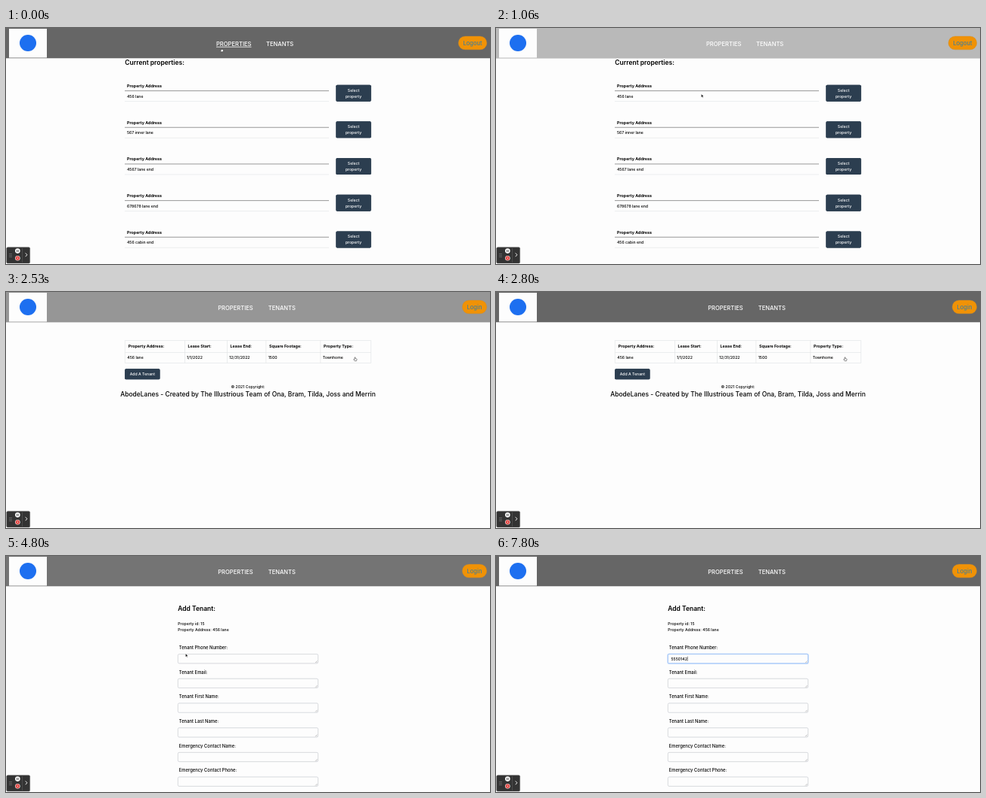
Write an HTML page that moves like this. It is 640x314 px and loops after 8 s.

```html
<!DOCTYPE html>
<html lang="en">
<head>
<meta charset="utf-8">
<title>Property manager</title>
<style>
  html, body { margin: 0; width: 100%; height: 100%; overflow: hidden; background: #fdfdfd; }
  svg { display: block; width: 100vw; height: 100vh; }
  text { font-family: Inter, "Open Sans", sans-serif; font-size: 5.15px; font-weight: 450; fill: #000; white-space: pre; }
  .bold { font-size: 5.35px; font-weight: 700; }
  .title { font-size: 8.5px; font-weight: 560; }
  .footer { font-size: 8.47px; font-weight: 540; }
  .label { font-size: 5.88px; }
  .nav { font-size: 7.6px; font-weight: 480; fill: #fff; }
  .pill { font-size: 7.5px; font-weight: 480; fill: #467f98; }
  .mid { text-anchor: middle; }
  .button text { fill: #fff; }
  .button rect { fill: #2c3e50; }
  .button.hover rect { fill: #587a9c; }
  .button.hover text { text-decoration: underline; }
  .button.focus rect { stroke: #5a96ee; stroke-width: 1.2; }
  .button.focus .ring { stroke: #aecdf8; stroke-width: 2.6; }
  .field rect { fill: #fdfdfd; stroke: #d3d6da; stroke-width: .7; }
  .field.focus rect { stroke: #86b4f5; }
  .field.focus .ring { stroke: #cfe2fc; stroke-width: 2.4; }
</style>
</head>
<body>
<svg id="stage" viewBox="0 0 640 314" preserveAspectRatio="none"></svg>
<script>
const LOOP = 8000;
const LOADS = [760, 2080, 4200];
const FADE = 660;
const CLICKS = [[1870, 2080], [4060, 4200], [5600, 5800]];
const PHONE = "5550142";
const KEYS = [6400, 6600, 6800, 7060, 7260, 7530, 7800];
const ADDRESSES = ["456 lane", "567 inner lane", "4567 lane end", "678678 lane end", "456 cabin end"];

// time, x, y of the pointer tip
const PATH = [
  [0, 285, 27], [650, 285, 27], [1060, 271.5, 88], [1150, 271.5, 88],
  [1750, 461.5, 87], [2850, 461.5, 87], [3660, 185.5, 108.5], [4250, 185.5, 108.5],
  [4800, 237.5, 130], [5130, 237.5, 130], [5400, 238, 136.5], [LOOP, 238, 136.5]
];

const stage = document.getElementById("stage");

function add(parent, tag, attrs = {}, content = "") {
  const node = document.createElementNS("http://www.w3.org/2000/svg", tag);
  for (const name in attrs) node.setAttribute(name, attrs[name]);
  node.textContent = content;
  return parent.appendChild(node);
}
const group = (parent, attrs) => add(parent, "g", attrs);
const text = (parent, x, y, content, cls = "") => add(parent, "text", { x, y, class: cls }, content);
const rect = (parent, x, y, width, height, attrs = {}) =>
  add(parent, "rect", { x, y, width, height, ...attrs });
const circle = (parent, cx, cy, r, fill) => add(parent, "circle", { cx, cy, r, fill });
const path = (parent, d, stroke, width = 0.6, fill = "none") =>
  add(parent, "path", { d, stroke, "stroke-width": width, fill });
const show = (node, visible) => node.setAttribute("display", visible ? "inline" : "none");

function button(parent, x, y, w, h, lines) {
  const g = group(parent, { class: "button" });
  rect(g, x, y, w, h, { rx: 1.6, class: "ring" });
  rect(g, x, y, w, h, { rx: 1.6 });
  const top = y + h / 2 + 1.9 - (lines.length - 1) * 3.9;
  lines.forEach((line, i) => text(g, x + w / 2, top + i * 7.8, line, "mid"));
  return g;
}

function buildList(parent) {
  const g = group(parent);
  text(g, 157.3, 49.4, "Current properties:", "title");
  const buttons = ADDRESSES.map((address, i) => {
    const y = i * 48.67;
    text(g, 160, 79 + y, "Property Address", "bold");
    path(g, `M157 ${83.6 + y}H427`, "#555", 0.6);
    text(g, 160, 92.6 + y, address);
    path(g, `M157 ${97.6 + y}H427`, "#dfe2e5", 0.6);
    return button(g, 436.4, 75.7 + y, 46.3, 22, ["Select", "property"]);
  });
  return { g, button: buttons[0] };
}

function buildDetails(parent) {
  const g = group(parent);
  path(g, "M157.3 64.5H482.6V94.5H157.3ZM157.3 80.5H482.6M236.5 64.5V94.5M292.5 64.5V94.5M343.8 64.5V94.5M415.8 64.5V94.5", "#dfe2e5");
  const columns = [
    [160.3, "Property Address:", ADDRESSES[0]],
    [239, "Lease Start:", "1/1/2022"],
    [295.2, "Lease End:", "12/31/2022"],
    [346.7, "Square Footage:", "1500"],
    [418.7, "Property Type:", "Townhome"]
  ];
  for (const [x, head, value] of columns) {
    text(g, x + 1.4, 74.3, head, "bold");
    text(g, x, 89.2, value);
  }
  const addButton = button(g, 157.2, 102.3, 46.3, 14, ["Add A Tenant"]);
  text(g, 320, 127.6, "© 2021 Copyright:", "mid");
  text(g, 320, 138.8, "AbodeLanes - Created by The Illustrious Team of Ona, Bram, Tilda, Joss and Merrin", "footer mid");
  return { g, button: addButton };
}

function buildForm(parent) {
  const g = group(parent);
  text(g, 227.2, 73.2, "Add Tenant:", "title");
  text(g, 227.2, 92.3, "Property id: 15");
  text(g, 227.2, 100.3, "Property Address: " + ADDRESSES[0]);
  const labels = ["Tenant Phone Number:", "Tenant Email:", "Tenant First Name:",
    "Tenant Last Name:", "Emergency Contact Name:", "Emergency Contact Phone:"];
  const fields = labels.map((label, i) => {
    const y = i * 32.7;
    text(g, 228.8, 123.8 + y, label, "label");
    const field = group(g, { class: "field" });
    rect(field, 227.4, 130.6 + y, 185.2, 12.2, { rx: 1.6, class: "ring" });
    rect(field, 227.4, 130.6 + y, 185.2, 12.2, { rx: 1.6 });
    path(field, `M409 ${142 + y}l2.6-2.6M410.5 ${142 + y}l1.1-1.1`, "#777", 0.4);
    return field;
  });
  const typed = text(g, 231.5, 138.6, "");
  const caret = rect(g, 231.5, 133.7, 0.5, 6, { fill: "#111" });
  return { g, field: fields[0], typed, caret };
}

function buildHeader(parent) {
  rect(parent, 0, 40, 640, 1, { fill: "#000", opacity: 0.14 });
  const bar = rect(parent, 0, 0, 640, 40);
  rect(parent, 4, 1, 50, 38.5, { fill: "#fdfdfd" });
  circle(parent, 29, 20, 11, "#1d6ff0");
  const nav = [text(parent, 278, 23.8, "PROPERTIES", "nav"), text(parent, 344, 23.8, "TENANTS", "nav")];
  const pill = rect(parent, 598, 11, 38, 17.8, { rx: 8.9, fill: "#f09206", stroke: "#d08c28", "stroke-width": 0.4 });
  const pillText = text(parent, 617, 22.5, "", "pill mid");
  return { bar, nav, pill, pillText };
}

function buildRecorder(parent) {
  rect(parent, 0.8, 291.8, 30.8, 21.2, { rx: 1.5, fill: "#333", stroke: "#555", "stroke-width": 0.5 });
  for (let i = 0; i < 6; i++)
    circle(parent, 5 + (i % 2) * 2, 300.4 + (i >> 1) * 2, 0.5, "#aaa");
  circle(parent, 15.4, 296.6, 3.3, "#fff");
  path(parent, "M14.5 295.2v2.8M16.3 295.2v2.8", "#333", 0.8);
  circle(parent, 15.4, 306.2, 3.3, "#f6e4e4");
  circle(parent, 15.4, 306.2, 2.6, "#e03c38");
  path(parent, "M14.5 305.3l1.8 1.8M16.3 305.3l-1.8 1.8", "#fff", 0.6);
  path(parent, "M21.6 293V312", "#666", 0.5);
  path(parent, "M25.7 299.4l2.2 2.4-2.2 2.4", "#fff", 0.9);
}

function buildPointer(parent) {
  const g = group(parent);
  const ring = add(g, "circle", {
    cx: 0.4, cy: -0.6, r: 10.8, fill: "#c02850", "fill-opacity": 0.06,
    stroke: "#c0284f", "stroke-width": 1.1, "stroke-opacity": 0.7
  });
  const arrow = path(g, "M0 0V4.2L1 3.3 1.7 4.8 2.4 4.5 1.7 3.1H3Z", "#fff", 0.3, "#000");
  const hand = path(g, "M-.5 0Q0-.5.5 0V1.5L2.2 2Q2.7 2.3 2.4 3.2L1.9 4.7H-.5L-1.8 2.7Q-1.6 2.1-.5 2.7Z", "#222", 0.5, "#fff");
  const beam = path(g, "M-1-2.8Q0-2.8 0-2Q0-2.8 1-2.8M0-2V2M-1 2.8Q0 2.8 0 2Q0 2.8 1 2.8", "#111", 0.5);
  return { g, ring, arrow, hand, beam };
}

const list = buildList(stage);
const details = buildDetails(stage);
const form = buildForm(stage);
const header = buildHeader(stage);
buildRecorder(stage);
const pointer = buildPointer(stage);

function pointerAt(t) {
  const i = PATH.findIndex((p, k) => k > 0 && t <= p[0]);
  const [t0, x0, y0] = PATH[i - 1], [t1, x1, y1] = PATH[i];
  const u = (t - t0) / (t1 - t0), e = u * u * (3 - 2 * u);
  return [x0 + (x1 - x0) * e, y0 + (y1 - y0) * e];
}

// The header fades from white to grey after each page load.
function headerShade(t) {
  const start = LOADS.filter(load => load <= t).pop();
  const progress = start === undefined ? 1 : Math.min(1, (t - start) / FADE);
  return Math.round(255 - 153 * progress);
}

function render(t) {
  const onList = t < LOADS[1], onDetails = !onList && t < LOADS[2], onForm = t >= LOADS[2];
  show(list.g, onList);
  show(details.g, onDetails);
  show(form.g, onForm);

  const shade = headerShade(t);
  header.bar.setAttribute("fill", `rgb(${shade},${shade},${shade})`);
  header.nav[0].setAttribute("x", onList ? 278 : 280.2);
  header.nav[1].setAttribute("x", onList ? 344 : 346.7);
  header.pill.setAttribute("x", onList ? 598.2 : 603.3);
  header.pill.setAttribute("width", onList ? 37.6 : 32.4);
  header.pillText.setAttribute("x", onList ? 617 : 619.5);
  header.pillText.textContent = onList ? "Logout" : "Login";

  const [x, y] = pointerAt(t);
  const overNav = onList && y < 30;
  const overSelect = onList && x > 436;
  const overAdd = onDetails && x < 203.5 && y > 102;
  const overField = onForm && y > 131;
  const overHand = overNav || overSelect || overAdd || (onDetails && t < 2850);
  header.nav[0].setAttribute("text-decoration", overNav ? "underline" : "none");
  list.button.setAttribute("class", "button" + (overSelect ? " hover" : "") + (t >= CLICKS[0][0] ? " focus" : ""));
  details.button.setAttribute("class", "button" + (overAdd ? " hover" : "") + (t >= CLICKS[1][0] ? " focus" : ""));

  pointer.g.setAttribute("transform", `translate(${x} ${y})`);
  show(pointer.g, t < KEYS[0]);
  show(pointer.hand, overHand);
  show(pointer.beam, overField);
  show(pointer.arrow, !overHand && !overField);
  show(pointer.ring, CLICKS.some(([from, to]) => t >= from && t < to));

  const focused = t >= CLICKS[2][0];
  form.field.setAttribute("class", focused ? "field focus" : "field");
  form.typed.textContent = PHONE.slice(0, KEYS.filter(key => key <= t).length);
  show(form.caret, focused && (t < 6100 || t >= KEYS[0]));
  if (onForm) form.caret.setAttribute("x", 231.6 + form.typed.getComputedTextLength());
}

const begin = performance.now();
function tick() {
  render((performance.now() - begin) % LOOP);
  requestAnimationFrame(tick);
}
tick();
</script>
</body>
</html>
```
